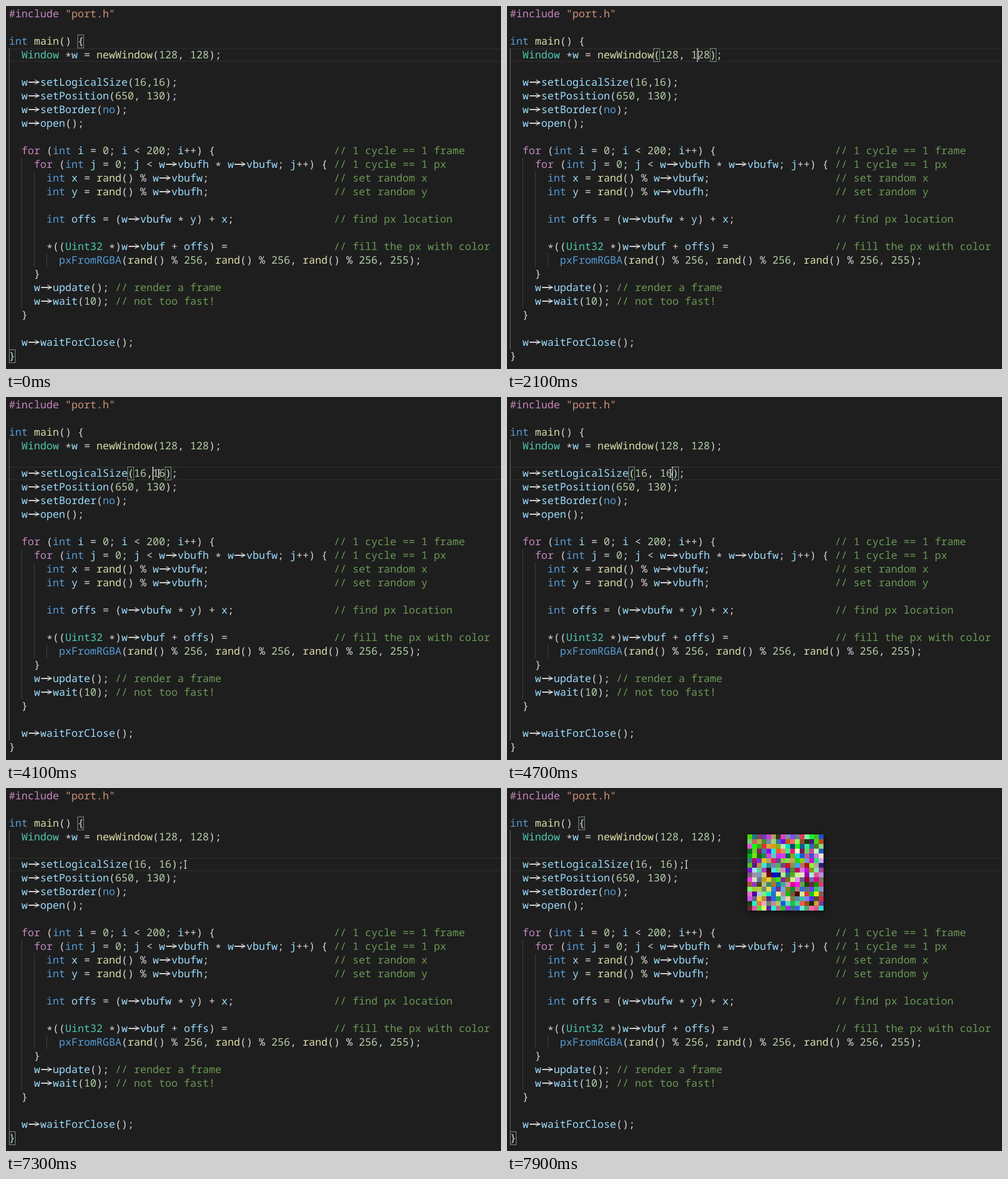
An HTML page with a canvas for the animation above (8 s loop, 832 by 610 pixels).

```html
<!DOCTYPE html>
<html lang="en">
<head>
<meta charset="utf-8">
<style>
  html, body { margin: 0; width: 100%; height: 100%; overflow: hidden; background: #1e1e1e; }
  pre, div, canvas, svg { position: absolute; box-sizing: border-box; }
  pre {
    margin: 0; left: 5px; top: 2px; color: #d4d4d4;
    font: 17.5px/23px "Noto Sans Mono", "DejaVu Sans Mono", monospace;
    font-variant-ligatures: none; text-rendering: geometricPrecision;
  }
  .control { color: #c586c0; }
  .keyword { color: #569cd6; }
  .type { color: #4ec9b0; }
  .call { color: #dcdcaa; }
  .name { color: #9cdcfe; }
  .number { color: #b5cea8; }
  .string { color: #ce9178; }
  .comment { color: #6a9955; }
  .star, .arrow { position: relative; }
  .star { top: 3px; }
  .arrow i { color: transparent; font-style: normal; }
  .arrow::before {
    content: ""; position: absolute; left: 1px; top: 11px;
    width: 18px; height: 1.5px; background: #d4d4d4;
  }
  .guide { width: 1px; background: #404040; }
  .active { background: #707070; }
  .line { left: 6px; right: 0; height: 23px; border: solid #282828; border-width: 2px 0; }
  .match { height: 23px; border: 1px solid #888; background: rgba(0, 100, 0, .1); }
  .sel, .same { height: 23px; border-radius: 3px; background: #264f78; }
  .same { background: #373b40; border-radius: 0; }
  .caret { width: 2px; height: 23px; background: #aeafad; }
  #noise {
    left: 404px; top: 78px; width: 128px; height: 128px;
    image-rendering: pixelated; box-shadow: 0 3px 9px rgba(0, 0, 0, .55);
  }
  #mouse { left: 0; top: 0; overflow: visible; fill: none; }
</style>
</head>
<body>
<div id="back"></div>
<pre id="code">#include "port.h"

int main() {
  Window *w = newWindow(128, 128);

  w->setLogicalSize(16,@16);
  w->setPosition(650, 130);
  w->setBorder(no);
  w->open();

  for (int i = 0; i &lt; 200; i++) {                   // 1 cycle == 1 frame
    for (int j = 0; j &lt; w->vbufh * w->vbufw; j++) { // 1 cycle == 1 px
      int x = rand() % w->vbufw;                    // set random x
      int y = rand() % w->vbufh;                    // set random y

      int offs = (w->vbufw * y) + x;                // find px location

      *((Uint32 *)w->vbuf + offs) =                 // fill the px with color
        pxFromRGBA(rand() % 256, rand() % 256, rand() % 256, 255);
    }
    w->update(); // render a frame
    w->wait(10); // not too fast!
  }

  w->waitForClose();
}</pre>
<div id="front"></div>
<canvas id="noise" width="16" height="16"></canvas>
<svg id="mouse" width="1" height="1">
  <g id="beam" stroke-linecap="square">
    <path stroke="#111" stroke-width="3" d="M-2-6.5H2M0-6V6M-2 6.5H2"/>
    <path stroke="#fff" stroke-width="1.2" d="M-2-6.5H2M0-6V6M-2 6.5H2"/>
  </g>
</svg>
<script>
const LOOP = 8000, STEP = 100;
const $ = id => document.getElementById(id);

// Syntax colouring
const KINDS = [
  ['comment', /^\/\//], ['string', /^"/], ['number', /^\d/],
  ['control', /^(#include|for)$/], ['keyword', /^(int|no|pxFromRGBA)$/],
  ['type', /^(Window|Uint32)$/], ['call', /^(main|newWindow|rand)$/], ['name', /^\w/]
];
function paint(token) {
  if (token === '@') return '<span id="gap"></span>';
  if (token === '<') return '&lt;';
  if (token === '*') return '<span class="star">*</span>';
  if (token === '->') return '<span class="arrow"><i>-</i>&gt;</span>';
  const kind = KINDS.find(([, test]) => test.test(token))[0];
  return `<span class="${kind}">${token}</span>`;
}
$('code').innerHTML = $('code').textContent.replace(/\/\/.*|"[^"]*"|->|[#\w]+|[*<@]/g, paint);

// Editor states: line = highlighted row, other values are columns in `row`
const main = [[2, 11], [25, 0]];
const pair = (row, a, b) => [[row, a], [row, b]];
const args = pair(3, 23, 32), size = pair(5, 19, 25), wide = pair(5, 19, 26);
const states = [
  { t: 0, row: 3, match: main },
  { t: 1100, row: 3, caret: 26, match: args },
  { t: 1300, row: 3, caret: 27, sel: 24, same: 29, len: 3 },
  { t: 2000, row: 3, caret: 30, match: args },
  { t: 2300, row: 3, caret: 32, sel: 29, len: 3 },
  { t: 2400, row: 3, caret: 32, sel: 29, same: 24, len: 3 },
  { t: 3200, row: 5, caret: 21, match: size },
  { t: 3400, row: 5, caret: 22, sel: 20, same: 23, len: 2, match: size },
  { t: 3700, row: 5, caret: 24, match: size },
  { t: 3900, row: 5, caret: 25, sel: 23, same: 20, len: 2, match: size },
  { t: 4100, row: 5, caret: 23, match: size },
  { t: 4300, row: 5, caret: 24, match: wide },
  { t: 4600, row: 5, caret: 26, match: wide },
  { t: 4800, row: 5, caret: 26, sel: 24, same: 20, len: 2, match: wide },
  { t: 5300, row: 5, caret: 28, match: main },
  { t: 5900, row: 5, match: main },
  { t: 6400, row: 5, caret: 28, match: main },
  { t: 7300, row: 5, match: main }
];
const TYPED = 4300, MOUSE_IN = 300, WINDOW_OPEN = 7600;

// Pointer path: time, x, y
const path = [
  [300, 289, 82], [500, 280, 38], [600, 280, 47], [900, 280, 47], [1000, 279, 68],
  [1100, 279, 82], [1500, 279, 82], [2000, 321, 82], [2300, 321, 82], [2400, 262, 113],
  [3000, 262, 113], [3200, 228, 127], [3400, 228, 127], [3700, 256, 128], [4100, 256, 128],
  [4500, 274, 128], [4800, 274, 128], [4900, 288, 128], [5000, 301, 128], [LOOP, 301, 128]
];

const colX = col => 5 + 10.5 * col;
const rowY = row => 2 + 23 * row;
const box = (kind, row, col, len = 1) =>
  `<div class="${kind}" style="left:${Math.floor(colX(col))}px;top:${rowY(row)}px;width:${Math.round(10.5 * len)}px"></div>`;
const guide = (col, from, to, active) =>
  `<div class="guide ${active ? 'active' : ''}" style="left:${colX(col)}px;top:${rowY(from)}px;height:${23 * (to - from)}px"></div>`;

function drawEditor(s) {
  const { row, caret, sel, same, len, match = [] } = s;
  const plain = sel === undefined;
  let html = '';
  if (plain) html += `<div class="line" style="top:${rowY(row)}px;left:6px;width:826px"></div>`;
  html += guide(0, 3, 25, plain) + guide(2, 11, 22) + guide(4, 12, 19) + guide(6, 18, 19);
  if (!plain) html += box('sel', row, sel, len);
  if (same !== undefined) html += box('same', row, same, len);
  for (const [r, c] of match) html += box('match', r, c, 1.05);
  $('back').innerHTML = html;
  $('front').innerHTML = caret === undefined ? '' :
    `<div class="caret" style="left:${Math.round(colX(caret) - 1)}px;top:${rowY(row)}px"></div>`;
}

function drawMouse(t) {
  $('mouse').style.display = t < MOUSE_IN ? 'none' : '';
  if (t < MOUSE_IN) return;
  const i = path.findIndex(p => p[0] > t);
  const [t0, x0, y0] = path[i - 1], [t1, x1, y1] = path[i];
  const k = (t - t0) / (t1 - t0);
  $('beam').setAttribute('transform', `translate(${x0 + (x1 - x0) * k + .5} ${y0 + (y1 - y0) * k + .5})`);
}

function drawNoise(t) {
  const open = t >= WINDOW_OPEN;
  $('noise').style.display = open ? '' : 'none';
  if (!open) return;
  const g = $('noise').getContext('2d');
  let seed = t;
  const byte = () => (seed = (Math.imul(seed, 1664525) + 1013904223) >>> 0) >>> 24;
  for (let i = 0; i < 256; i++) {
    g.fillStyle = `rgb(${byte()},${byte()},${byte()})`;
    g.fillRect(i % 16, i >> 4, 1, 1);
  }
}

let last = -1;
function tick(now) {
  const t = Math.floor(now % LOOP / STEP) * STEP;
  if (t !== last) {
    last = t;
    $('gap').textContent = t >= TYPED ? ' ' : '';
    drawEditor(states.filter(s => s.t <= t).pop());
    drawMouse(t);
    drawNoise(t);
  }
  requestAnimationFrame(tick);
}
tick(0);
</script>
</body>
</html>
```
